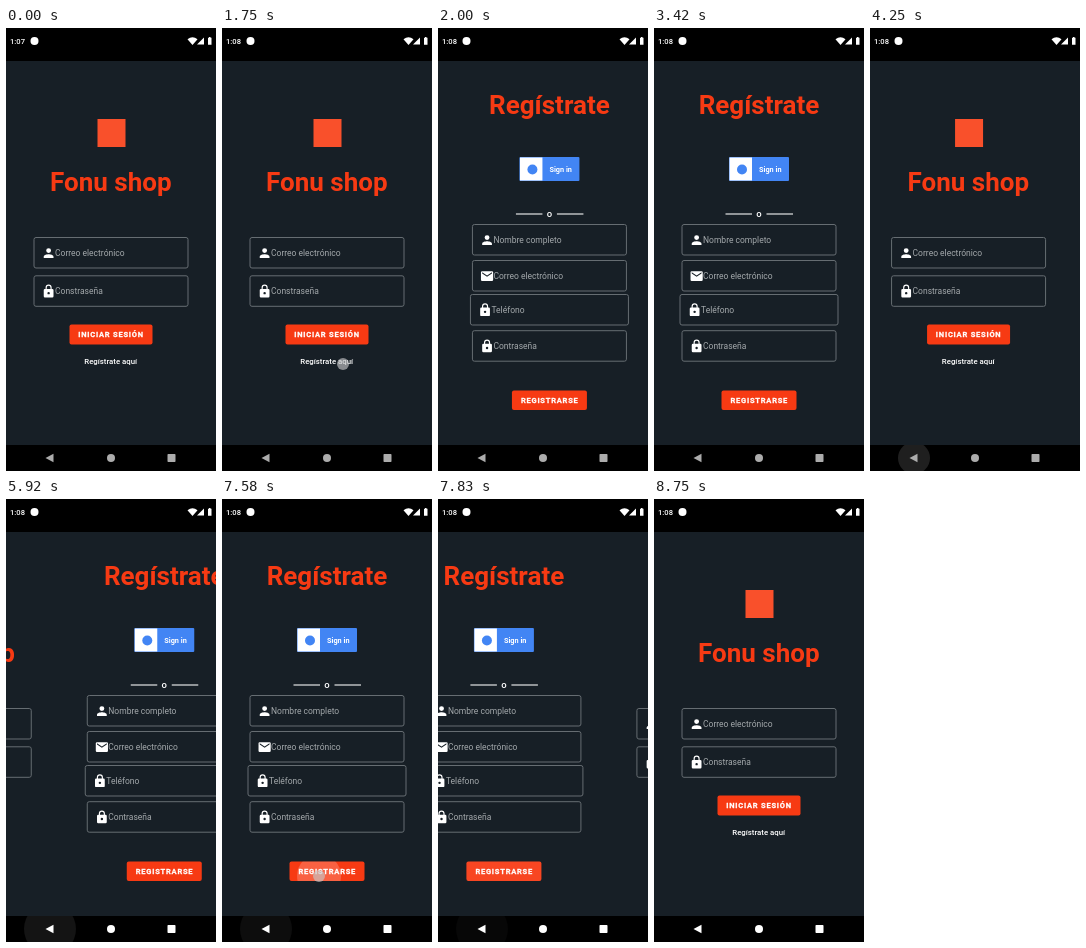
Recreate the animation shown at these times as an HTML page. Size 210 by 443 pixels, loop 9080 ms.

```html
<!DOCTYPE html>
<html lang="es">
<head>
<meta charset="utf-8">
<style>
html, body { margin: 0; width: 100%; height: 100%; overflow: hidden; background: #171f26; }
svg { display: block; width: 210px; height: 443px; font-family: Roboto, sans-serif; }
.title { font-size: 26px; font-weight: 700; fill: #f73a13; text-anchor: middle; }
.hint { font-size: 8.5px; fill: #a3a8ab; }
.box { fill: none; stroke: #666d72; }
.button { fill: #f73a13; }
.label { font-size: 7.5px; font-weight: 700; letter-spacing: .78px; fill: #fff; stroke: #fff; stroke-width: .3; }
.white { fill: #fff; }
.rule { stroke: #b9bcbe; stroke-width: 1.5; }
</style>
</head>
<body>
<svg viewBox="0 0 210 443">
  <defs>
    <path id="person" d="M12 12a4 4 0 1 0 0-8 4 4 0 0 0 0 8zm0 2c-2.7 0-8 1.3-8 4v2h16v-2c0-2.7-5.3-4-8-4z"/>
    <path id="mail" d="M20 4H4a2 2 0 0 0-2 2v12a2 2 0 0 0 2 2h16a2 2 0 0 0 2-2V6a2 2 0 0 0-2-2zm0 4-8 5-8-5V6l8 5 8-5z"/>
    <path id="lock" fill-rule="evenodd" d="M18 8h-1V6A5 5 0 0 0 7 6v2H6a2 2 0 0 0-2 2v10a2 2 0 0 0 2 2h12a2 2 0 0 0 2-2V10a2 2 0 0 0-2-2zm-6 9a2 2 0 1 1 0-4 2 2 0 0 1 0 4zm3.1-9H8.9V6a3.1 3.1 0 0 1 6.2 0z"/>
    <clipPath id="inButton"><rect x="67.5" y="362.5" width="75" height="19.5" rx="2"/></clipPath>
    <clipPath id="inBar"><rect y="417" width="210" height="26"/></clipPath>
  </defs>
  <rect width="210" height="443" fill="#171f26"/>

  <g id="login">
    <rect x="91.5" y="91" width="28" height="28" fill="#f9502b"/>
    <text class="title" x="104.8" y="163">Fonu shop</text>
    <g id="loginFields"></g>
    <rect class="button" x="63.5" y="296.5" width="83" height="20" rx="2"/>
    <text class="label" x="72.3" y="309.3">INICIAR SESIÓN</text>
    <text class="white" x="78.3" y="336" font-size="7.8" font-weight="500">Regístrate aquí</text>
  </g>

  <g id="register">
    <text class="title" x="105" y="86">Regístrate</text>
    <rect x="75" y="129" width="60" height="24" rx="1" fill="#4285f4"/>
    <rect x="75.5" y="129.5" width="22.5" height="23" fill="#fff"/>
    <circle cx="88" cy="141.5" r="5" fill="#4285f4"/>
    <text class="white" x="105" y="144.3" font-size="7.3" font-weight="700">Sign in</text>
    <path class="rule" d="M71.5 186H98M112.5 186H139"/>
    <text class="white" x="105" y="188.7" font-size="9.5" font-weight="500" text-anchor="middle">o</text>
    <g id="registerFields"></g>
    <rect class="button" x="67.5" y="362.5" width="75" height="19.5" rx="2"/>
    <circle id="press" cx="97" cy="377" fill="#fff" clip-path="url(#inButton)"/>
    <text class="label" x="76.5" y="375">REGISTRARSE</text>
  </g>

  <circle id="touch" r="6" fill="#c4c6c8"/>

  <rect width="210" height="33" fill="#000"/>
  <g class="white">
    <text id="clock" x="4" y="16.2" font-size="7.6" font-weight="500"></text>
    <circle cx="28.5" cy="13" r="4"/>
    <path d="M181.5 11.2q5-3.8 10 0L186.5 17z"/>
    <path d="M198 9.5V16.5H191z"/>
    <path d="M202 9.8h1v-.8h1.5v.8h1v7h-3.5z"/>
  </g>

  <rect y="417" width="210" height="26" fill="#000"/>
  <circle id="ripple" cx="44" cy="430" fill="#fff" clip-path="url(#inBar)"/>
  <g id="nav">
    <path d="M39.5 430l8-4.3v8.6z"/>
    <circle cx="105" cy="430" r="4"/>
    <rect x="161.5" y="426" width="8" height="8" rx=".7"/>
  </g>
</svg>
<script>
const LOOP = 9080, WIDTH = 210, SLIDE = 250;
const $ = id => document.getElementById(id);

const field = (icon, hint, y, grow = 0) => `
  <rect class="box" x="${28 - grow}" y="${y}" width="${154 + 2 * grow}" height="30.5" rx="2"/>
  <use class="white" href="#${icon}" transform="translate(${35.3 - grow} ${y + 8.2}) scale(.61)"/>
  <text class="hint" x="${49 - grow}" y="${y + 18.5}">${hint}</text>`;

$('loginFields').innerHTML =
  field('person', 'Correo electrónico', 209.5) + field('lock', 'Constraseña', 247.8);
$('registerFields').innerHTML =
  field('person', 'Nombre completo', 196.5) + field('mail', 'Correo electrónico', 232.5) +
  field('lock', 'Teléfono', 266.5, 2) + field('lock', 'Contraseña', 302.7);

// Each slide swaps the two screens: start time, direction of travel
const slides = [[1779, -1], [4029, 1], [5755, -1], [7760, -1]];
// Finger dots: from, to, x, y
const touches = [[1500, 1860, 121, 336], [5480, 5800, 121, 336], [7500, 7800, 97, 377]];

const span = (t, a, b) => Math.min(1, Math.max(0, (t - a) / (b - a)));
const set = (id, attrs) => {
  for (const key in attrs) $(id).setAttribute(key, attrs[key]);
};
const place = (id, x) => set(id, { transform: `translate(${x} 0)` });

function drawScreens(t) {
  const i = slides.filter(([start]) => t >= start).length - 1;
  if (i < 0) {
    place('login', 0);
    place('register', WIDTH);
    return;
  }
  const [start, dir] = slides[i];
  const k = (1 - Math.cos(Math.PI * span(t, start, start + SLIDE))) / 2;
  const [next, last] = i % 2 ? ['login', 'register'] : ['register', 'login'];
  place(last, dir * WIDTH * k);
  place(next, -dir * WIDTH * (1 - k));
}

function draw(t) {
  drawScreens(t);
  $('clock').textContent = t < 80 ? '1:07' : '1:08';

  const touch = touches.find(([from, to]) => t >= from && t < to);
  set('touch', touch
    ? { cx: touch[2], cy: touch[3], opacity: .65 * (1 - span(t, touch[1] - 80, touch[1])) }
    : { opacity: 0 });

  set('press', {
    r: t < 7500 ? 0 : 10 + 12 * span(t, 7500, 7580) + 40 * span(t, 7590, 7800),
    opacity: .2 * (1 - span(t, 7680, 7900))
  });

  // The back key keeps a faint glow until the form is sent
  set('ripple', {
    r: 16 * span(t, 3830, 4100) + 10 * span(t, 4260, 4650),
    opacity: .12 - .04 * span(t, 4350, 5080) - .03 * span(t, 6250, 7500) - .05 * span(t, 7600, 8100)
  });
  set('nav', { fill: t < 4750 ? '#acacac' : '#fff' });
}

function frame() {
  draw(performance.now() % LOOP);
  requestAnimationFrame(frame);
}
frame();
</script>
</body>
</html>
```
